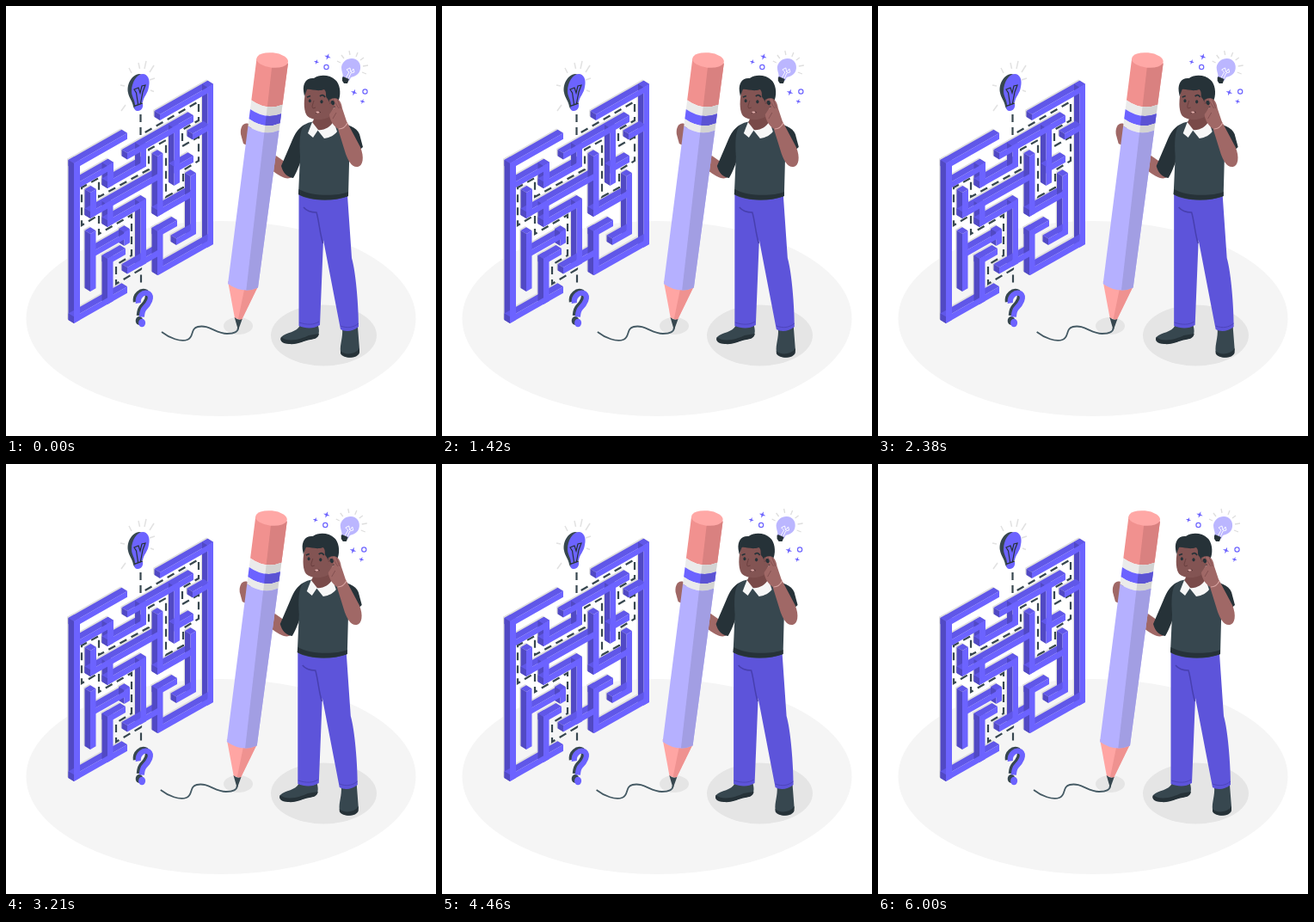
Animation, 500 px wide and 500 px high, one loop 6040 ms. Source, as an HTML page with a canvas:

```html
<!DOCTYPE html>
<html lang="en">
<head>
<meta charset="utf-8">
<title>Finding the way</title>
<style>
html, body { margin: 0; width: 100%; height: 100%; overflow: hidden; background: #fff; }
canvas { display: block; width: 500px; height: 500px; }
</style>
</head>
<body>
<canvas id="stage"></canvas>
<script>
const canvas = document.getElementById('stage');
const ctx = canvas.getContext('2d');
const ratio = window.devicePixelRatio || 1;
canvas.width = canvas.height = 500 * ratio;

const VIOLET = '#6c63ff', TOP = '#6057e8', SIDE = '#5149c4', TROUSERS = '#5d54da';
const INK = '#263238', SLATE = '#37474f';
const FACE = '#835453', HAND = '#a06866';
const LOOP = 6040, STEP = 1000 / 24, SHAKE = 6000;
const OFFSETS = [0, -1, 2, -4, 4, -4, 4, -4, 2, -1, 0];

const fill = (d, color) => { ctx.fillStyle = color; ctx.fill(new Path2D(d)); };
function line(d, color, width = 1, dash = []) {
  ctx.strokeStyle = color;
  ctx.lineWidth = width;
  ctx.setLineDash(dash);
  ctx.stroke(new Path2D(d));
}
function oval(x, y, rx, ry, color, turn = 0) {
  ctx.fillStyle = color;
  ctx.beginPath();
  ctx.ellipse(x, y, rx, ry, turn, 0, Math.PI * 2);
  ctx.fill();
}
function ring(x, y, r) {
  ctx.strokeStyle = VIOLET;
  ctx.lineWidth = 1.2;
  ctx.setLineDash([]);
  ctx.beginPath();
  ctx.arc(x, y, r, 0, Math.PI * 2);
  ctx.stroke();
}
function poly(color, ...pts) {
  ctx.fillStyle = color;
  ctx.beginPath();
  pts.forEach(p => ctx.lineTo(p[0], p[1]));
  ctx.fill();
}

// Maze walls as front faces: left x, right x, top y at the left, height
const SLOPE = 0.568, DX = 6.5, DY = 4;
const WALLS = [
  [79, 141, 183, 7], [179, 241, 126, 7], [79, 86, 183, 186], [234.5, 241, 94.7, 186],
  [79, 141, 361.5, 7.5], [177, 241, 305.5, 7.5],
  [217, 236, 148.5, 7], [141, 218, 171, 7.5],
  [195.5, 202, 142, 67], [195.5, 218, 187, 7.5],
  [86, 125, 204, 7], [118, 125, 186, 26], [118, 163, 204.5, 7.5], [156.5, 163, 163, 27],
  [98, 105, 217, 30], [98, 177, 239.5, 7.5],
  [176, 182.5, 175, 70], [176, 216, 237.5, 7.5], [214.5, 221, 198, 70], [198, 221, 270.5, 7.5],
  [118, 124.5, 231, 26], [118, 163, 249.5, 7.5], [156.5, 163, 229, 74], [141, 177, 304, 7.5],
  [98, 104.5, 265, 67], [104, 144, 283.5, 7], [137.5, 144, 263, 16],
  [118, 139, 294, 7], [118, 124.5, 294, 53],
  [176, 199, 262, 7], [176, 182.5, 262, 51]
];

function wallSides([x0, x1, y, h], dx, dy, topColor, sideColor) {
  const y1 = y - SLOPE * (x1 - x0);
  poly(topColor, [x0, y], [x1, y1], [x1 - dx, y1 - dy], [x0 - dx, y - dy]);
  poly(sideColor, [x0, y], [x0 - dx, y - dy], [x0 - dx, y + h - dy], [x0, y + h]);
}
function wallFront([x0, x1, y, h]) {
  const y1 = y - SLOPE * (x1 - x0);
  poly(VIOLET, [x0, y], [x1, y1], [x1, y1 + h], [x0, y + h]);
}

function maze() {
  WALLS.forEach(w => wallSides(w, DX + 1.3, DY + 1.3, '#dedede', '#dedede'));
  line('M156.5 126V150L224 111V133L205 144V163L224 152V180L206 191V211L186 222V156L166 167V190' +
    'L108 222V200L88 211V255L108 243V265L146 243V290L128 301V323L157 306V327', SLATE, 2.2, [9, 6]);
  WALLS.forEach(w => wallSides(w, DX, DY, TOP, SIDE));
  WALLS.forEach(wallFront);
}

function mazeBulb() {
  line('M154 66L155.5 73M143 72L146 78M172 69L167 77M163 64L161 73M133 92L138 93M134 122L139 115' +
    'M167 86L173 84M168 98L172 99.5', '#e2e2e2', 1.5);
  fill('M155 79C146 80 140 91 142 101C143 107 147 110 148 117C149 121 154 122 157 120L163 81Z', SLATE);
  fill('M159 79C165 79 168 86 166 94C165 102 160 105 159 112L150 115.5C150 109 146 106 146 99C146 89 152 79 159 79Z', VIOLET);
  fill('M149.5 117L159 113.5C160 118 157 122 153.5 122C150 122 149 120 149.5 117Z', VIOLET);
  line('M153.5 114L151.5 101L149 97L154 95L156 101L158 93L162 92L159 100L156.5 113M149.5 116.3L159 113', INK, 1.2);
}

function questionMark() {
  const hook = 'M153 345C152 337 159 331 165 334C170 338 165 346 160.5 350.5C157.5 353.5 157.5 356 157 361';
  ctx.save();
  ctx.translate(-2, -1);
  line(hook, SLATE, 6.5);
  oval(157, 367, 4.3, 5, SLATE);
  ctx.translate(2.8, 1.5);
  line(hook, VIOLET, 6.2);
  oval(157.3, 368, 4, 4.8, VIOLET);
  ctx.restore();
}

// Both rims of the pencil at a fraction of the way down the shaft
function rim(k) {
  return { l: [291.5 - 33.5 * k, 61 + 262 * k], r: [328 - 35 * k, 66.5 + 261 * k] };
}
function band(from, to, light, dark) {
  const a = rim(from), b = rim(to), sag = 10;
  const middle = (p, q) => [(p[0] + q[0]) / 2, (p[1] + q[1]) / 2 + sag];
  const shape = new Path2D();
  shape.moveTo(...a.l);
  shape.quadraticCurveTo(...middle(a.l, a.r), ...a.r);
  shape.lineTo(...b.r);
  shape.quadraticCurveTo(...middle(b.l, b.r), ...b.l);
  ctx.fillStyle = light;
  ctx.fill(shape);
  ctx.save();
  ctx.clip(new Path2D('M311 55L279 333V345H335V55Z'));
  ctx.fillStyle = dark;
  ctx.fill(shape);
  ctx.restore();
}

function pencil() {
  line('M181 379C190 386 203 391 211 388C219 385 214 375 223 373C236 370 244 381 257 381C266 381 270 379 270 374', '#455a64', 1.8);
  fill('M282 137C276 135 272 141 273 149L276 160L282 163L286 140Z', HAND);
  fill('M258 320L266 363L274 365L293 326Z', '#ffa5a3');
  fill('M278 325L270 364L274 365L293 326Z', '#ef9290');
  fill('M265.7 362Q270 366 274.7 364L270 377Z', SLATE);
  band(0, 0.185, '#f1918f', '#d98180');
  band(0.185, 0.225, '#ebebeb', '#d3d3d3');
  band(0.225, 0.268, VIOLET, '#5b53d3');
  band(0.268, 0.3, '#ebebeb', '#d3d3d3');
  band(0.3, 1, '#b5b0ff', '#a29ee3');
  oval(309.7, 63, 18.4, 8.7, '#ffa8a6', 0.1);
}

function legs() {
  fill('M342 371L363 372C365 379 364 385 358 387C348 387 341 394 329 392C321 392 318 389 320 385C326 379 338 380 342 371Z', SLATE);
  fill('M320 385C328 392 344 387 352 383L364 381C363 387 358 387 354 388C346 389 340 394 329 393C321 393 318 389 320 385Z', INK);
  fill('M391 375L409 373L411 399C410 411 391 411 389 402C388 393 392 386 391 375Z', SLATE);
  fill('M389 401C393 406 406 406 411 398V403C409 411 391 410 389 404Z', INK);
  fill('M340.5 217C355 225 385 226 397 220L402 293C407 310 410 350 410 373C403 379 394 379 389 376L369 272L365 371C357 376 348 375 340.5 372Z', TROUSERS);
  line('M346 234C350 239 357 240 361 240C364 250 365 265 368.5 276', '#473faf', 1.5);
  line('M341 368C350 371 358 371 364 367M389 372C397 375 404 374 410 369', '#4b43b7', 0.9);
}

function body() {
  fill('M310 172C316 175 320 178 325 182L332 199C327 203 318 198 308 190Z', HAND);
  fill('M347 138C340 142 336 148 332 158L320 186C322 194 327 199 334 200C339 192 344 178 347 165Z', INK);
  fill('M386 136C397 137 408 141 411 149L415 164L400 177L391 160Z', INK);
  fill('M347 138C341 144 341 160 342 175L340 219C352 227 382 228 398 221L399 183C401 165 397 143 389 137C375 132 358 132 347 138Z', SLATE);
  fill('M340.5 213C354 221 384 222 398 216V221C383 227 355 227 340 219Z', INK);
  fill('M361 125L380 123L382 136C377 143 369 146 362 144L356 136Z', '#794a49');
  fill('M356 135L351 148L357 153L363 144Z', '#f7f7f7');
  fill('M362 144L370 154C377 153 382 150 385 146L381 134C377 141 370 145 362 144Z', '#f7f7f7');
}

function head() {
  fill('M349 96C346 109 346 120 349 126C353 133 367 134 376 129L384 113L382 92Z', FACE);
  fill('M346 99C345 89 350 83 358 84C365 79 377 80 383 86C388 90 390 101 387 109L383 119L378 116L374 108C370 105 374 101 370 97C362 100 354 96 350 97L347 105Z', INK);
  fill('M376 109C381 105 386 109 384 115C381 120 376 119 375 116Z', FACE);
  oval(353.3, 110.3, 1.5, 2, INK);
  oval(367, 111.3, 1.6, 2.1, INK);
  line('M350 106L354 104.5M365 105C367 103 369 103 371 106', INK, 1.8);
  line('M358 110C357 114 355 117 357 119L360 118', '#693e3e', 1);
  line('M360 125C362 123 364 122 366 124', '#4d2b2f', 1);
  oval(362.5, 123.5, 2, 1, '#e4b1ae');
  line('M376 113L381 113', '#5e393b', 0.8);
}

function arm() {
  fill('M379 108C386 105 390 111 391 119L396 134L412 164C417 176 415 186 409 187C402 188 398 180 395 172L386 143C380 139 376 131 376 126C379 122 380 119 383 117L378 111Z', HAND);
  line('M380 108L387 119M385 108L389 119M384 124L380 131', '#814f50', 0.9);
  line('M387 143C391 143 395 140 397 136', '#d7a3a0', 1.2);
  oval(380, 112.5, 2, 2.7, INK, -0.4);
}

function star(x, y, r) {
  ctx.fillStyle = VIOLET;
  ctx.beginPath();
  for (let i = 0; i < 8; i++) {
    const a = i * Math.PI / 4 + 0.35, d = i % 2 ? r * 0.32 : r;
    ctx.lineTo(x + d * Math.cos(a), y + d * Math.sin(a));
  }
  ctx.fill();
}

function idea() {
  line('M399 52L400 57M409 54L407 59M416 60L412 63M415 70L421 69M414 77L419 79M390 57L393 61M385 64L389 66', '#dedede', 1.3);
  fill('M391 83L399 85L397 90L393 90L391 87Z', INK);
  fill('M402 61C409 61 413 67 412 73C411 80 405 82 401 83L399 87L391 83C393 80 390 77 390 71C391 65 396 61 402 61Z', '#bbb6ff');
  line('M395 84L399 77L396 74L400 72L401 77L404 73L405 77L401 78L398 85', '#fff', 0.9);
  line('M391.5 83L398.5 86', INK, 2);
  star(374, 59, 4);
  star(361, 65, 3.2);
  star(404.7, 100.5, 4);
  star(414.5, 111, 3.2);
  ring(372.5, 71, 2.6);
  ring(417.5, 99.5, 2.6);
}

function shift(time) {
  const t = Math.floor((time % LOOP + 6) / STEP) * STEP;
  const pos = Math.min(t / SHAKE, 1) * 10;
  const i = Math.min(Math.floor(pos), 9);
  return OFFSETS[i] + (OFFSETS[i + 1] - OFFSETS[i]) * (pos - i);
}

function draw(time) {
  ctx.setTransform(ratio, 0, 0, ratio, 0, 0);
  ctx.fillStyle = '#fff';
  ctx.fillRect(0, 0, 500, 500);
  oval(250, 363.5, 226.5, 113.5, '#f5f5f5');
  oval(369.5, 383, 61.5, 35.5, '#e5e5e5');
  oval(270, 372, 17, 10, '#e5e5e5');
  maze();
  mazeBulb();
  questionMark();
  ctx.translate(shift(time), 0);
  legs();
  body();
  pencil();
  head();
  arm();
  idea();
}

const start = performance.now();
function tick() {
  draw(performance.now() - start);
  requestAnimationFrame(tick);
}
tick();
</script>
</body>
</html>
```
